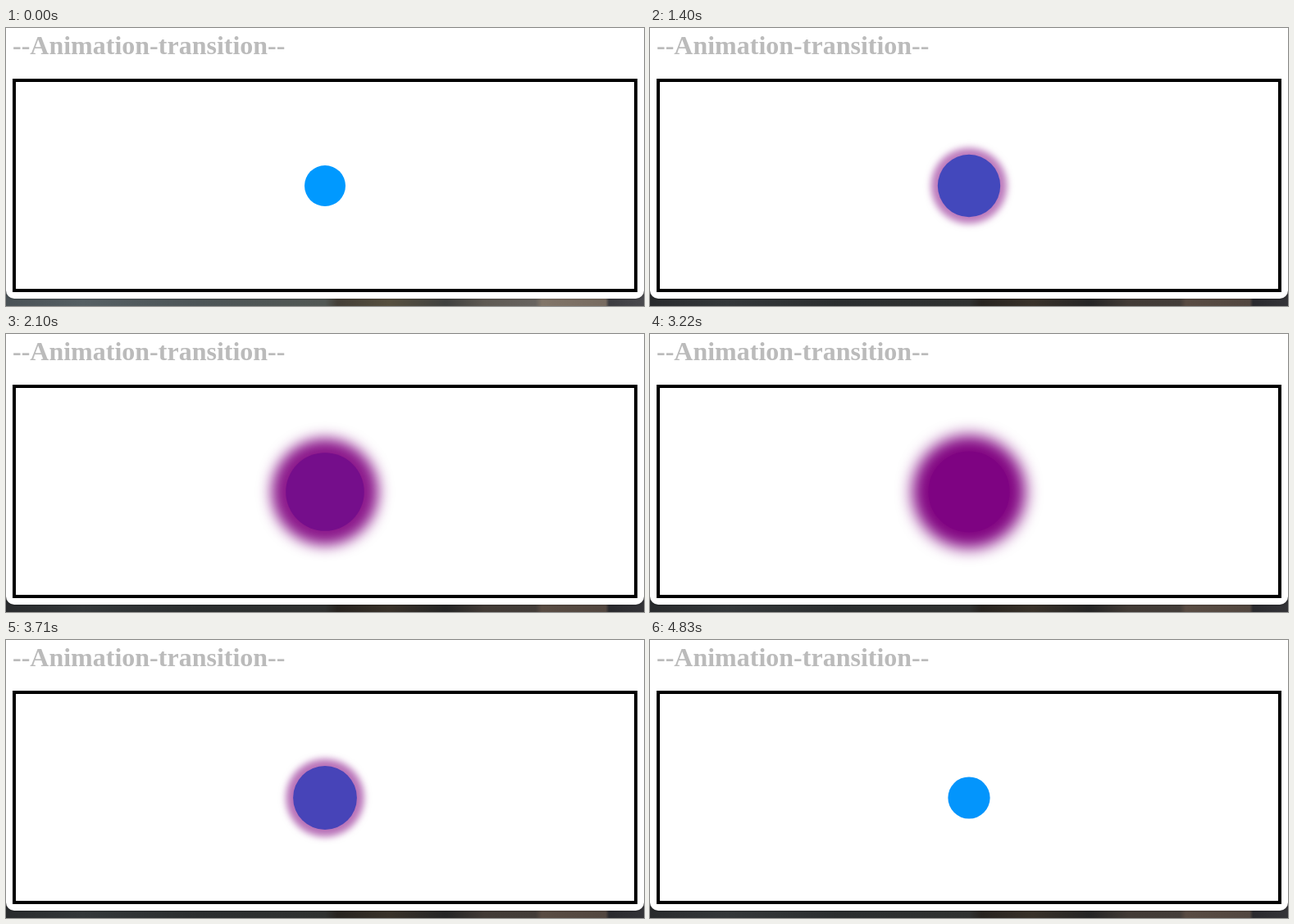
An HTML page that plays this animation: 778x340 px, repeating every 4.9 s.

```html
<!DOCTYPE html>
<html lang="en">
<head>
<meta charset="utf-8">
<title>Animation transition</title>
<style>
  html, body { margin: 0; width: 100%; height: 100%; overflow: hidden; }
  #desktop {
    position: absolute; inset: 0;
    background: linear-gradient(90deg, #4a5256, #566064 12%, #4d5557 30%, #525854 50%,
      #443f37 52%, #57503f 60%, #40413f 69%, #5f5a53 75%, #686460 83%,
      #827669 84%, #776b60 94%, #3d3d41 94.5%, #4a4a4e);
  }
  #desktop.dark {
    background: linear-gradient(90deg, #292b2d, #34383a 12%, #2b2e2f 30%, #303231 50%,
      #27231f 52%, #39322a 60%, #252525 69%, #423b36 75%, #433d39 83%,
      #594c43 84%, #524740 94%, #2a2a2e 94.5%, #343438);
  }
  #page {
    position: absolute; inset: 0 0 9px; background: #fff;
    border-radius: 0 0 10px 10px; box-shadow: 0 0 3px #0006;
  }
  h1 {
    position: absolute; left: 8px; top: 3px; margin: 0; color: #bbb; white-space: nowrap;
    font: bold 32px/37px "Liberation Serif", Times, serif;
  }
  #box {
    position: absolute; left: 8px; top: 62px; width: 762px; height: 261px;
    box-sizing: border-box; border: 4px solid #000;
  }
  #ball {
    position: absolute; left: 364px; top: 167.5px; width: 50px; height: 50px; border-radius: 50%;
  }
</style>
</head>
<body>
<div id="desktop"></div>
<div id="page">
  <h1>--Animation-transition--</h1>
  <div id="box"></div>
  <div id="ball"></div>
</div>
<script>
  const LOOP = 4900, STEP = 70, DURATION = 2100;
  const GROW = 755, SHRINK = 3151, DIM = 420;
  const desktop = document.getElementById('desktop');
  const ball = document.getElementById('ball');

  const bezier = (a, b, s) => 3 * a * s * (1 - s) ** 2 + 3 * b * s * s * (1 - s) + s ** 3;

  // CSS "ease": cubic-bezier(.25, .1, .25, 1)
  function ease(x) {
    if (x <= 0) return 0;
    if (x >= 1) return 1;
    let low = 0, high = 1;
    for (let i = 0; i < 24; i++) {
      const mid = (low + high) / 2;
      if (bezier(.25, .25, mid) < x) low = mid; else high = mid;
    }
    return bezier(.1, 1, low);
  }

  function draw(time) {
    const t = Math.floor(time % LOOP / STEP) * STEP;
    const p = ease((t - GROW) / DURATION) - ease((t - SHRINK) / DURATION);
    desktop.className = t >= DIM ? 'dark' : '';
    ball.style.transform = `scale(${1 + p})`;
    ball.style.background = `rgb(${128 * p}, ${153 * (1 - p)}, ${255 - 127 * p})`;
    ball.style.boxShadow = `0 0 ${10 * p}px ${10 * p}px rgba(128, 0, 128, ${p})`;
  }

  const start = performance.now();
  function tick() {
    draw(performance.now() - start);
    requestAnimationFrame(tick);
  }
  tick();
</script>
</body>
</html>
```
